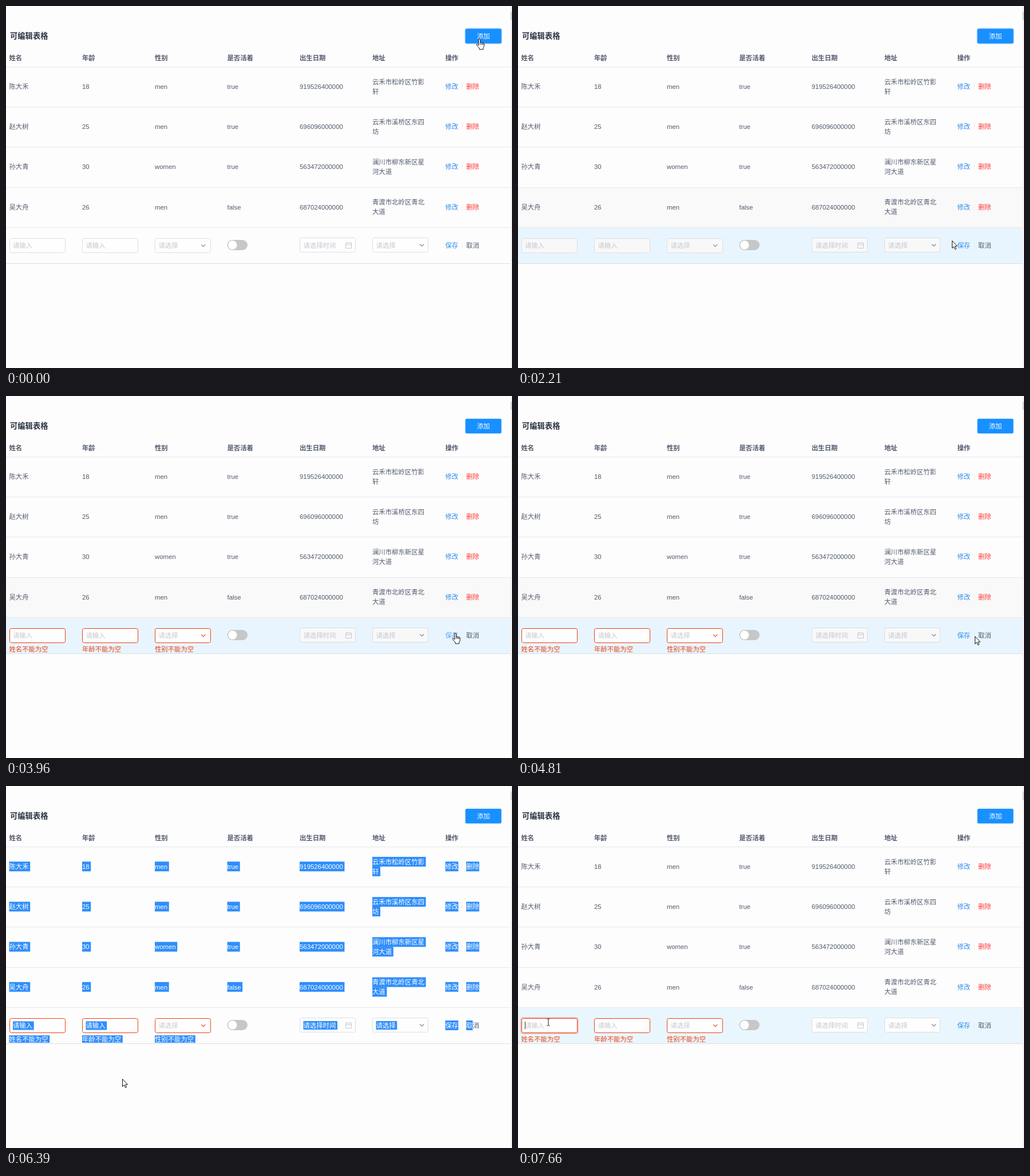
Write an HTML page that moves like this. It is 884x633 px and loops after 8000 ms.

```html
<!DOCTYPE html>
<html lang="zh-CN">
<head>
<meta charset="utf-8">
<title>可编辑表格</title>
<style>
  html, body { margin: 0; width: 100%; height: 100%; overflow: hidden; background: #fdfdfd; }
  svg { display: block; width: 884px; height: 633px; }
  text { font: 11.37px "Liberation Sans", "Noto Sans CJK SC", "Noto Sans CJK", sans-serif; white-space: pre; }
</style>
</head>
<body>
<svg id="stage" viewBox="0 0 884 633"></svg>
<script>
const LOOP = 8000;
const BLUE = '#2d8cf0', RED = '#ed4014', INK = '#515a6e', HINT = '#c5c8ce', EDGE = '#dcdee2';
const COLS = [5.5, 133, 260, 386.5, 513, 640, 767.5];
const ROW_TOPS = [106, 176, 246, 317, 387, 450];
const stage = document.getElementById('stage');

function add(tag, attrs, parent = stage) {
  const el = document.createElementNS('http://www.w3.org/2000/svg', tag);
  for (const k in attrs) el.setAttribute(k, attrs[k]);
  parent.appendChild(el);
  return el;
}
const set = (el, k, v) => el.setAttribute(k, v);
const show = (el, on) => set(el, 'visibility', on ? 'visible' : 'hidden');
const box = (x, y, width, height, fill, more) => add('rect', { x, y, width, height, fill, ...more });

// Text centred vertically on y
function label(x, y, str, fill = INK, more = {}) {
  const el = add('text', { x, y: y + 4.3, fill, ...more });
  el.textContent = str;
  return el;
}

// Text that can be shown as selected, with a highlight running `pad` past its end
const picks = [];
function pickable(x, y, str, fill = INK, pad = 2.6, h = 17) {
  const mark = box(x, y - h / 2, 0, h, '#2f8efa', { visibility: 'hidden' });
  const text = label(x, y, str, fill);
  const pick = { mark, text, fill, pad };
  picks.push(pick);
  return pick;
}
function select(pick, on) {
  if (on) set(pick.mark, 'width', pick.text.getComputedTextLength() + pick.pad);
  show(pick.mark, on);
  set(pick.text, 'fill', on ? '#fff' : pick.fill);
}

// Page, scrollbar, heading
box(0, 0, 884, 633, '#fdfdfd');
box(881.5, 0, 2.5, 633, '#f0f0f0');
box(881.5, 10, 2.5, 14, '#d2d2d2');
label(7, 53, '可编辑表格', '#2c3444', { style: 'font-size:13.3px;font-weight:700' });
const glow = box(802, 39, 64, 27, 'none', { rx: 4, stroke: BLUE, 'stroke-opacity': .25, 'stroke-width': 2 });
box(802.5, 39.8, 63, 25.6, '#1890ff', { rx: 2.5 });
label(834, 52.5, '添加', '#fff', { 'text-anchor': 'middle' });

// Table
const shades = ROW_TOPS.slice(0, 5).map((y, i) => box(0, y, 881, ROW_TOPS[i + 1] - y, '#e8f5fe', { opacity: 0 }));
const gray = box(0, ROW_TOPS[3], 881, 70, '#f9f9f9');
ROW_TOPS.forEach((y, i) => box(0, y, 881.5, 1, i === 5 ? EDGE : '#e6e8eb'));
['姓名', '年龄', '性别', '是否活着', '出生日期', '地址', '操作'].forEach((s, i) =>
  label(COLS[i], 90.5, s, INK, { style: 'font-weight:700' }));

const people = [
  ['陈大禾', '18', 'men', 'true', '919526400000', '云禾市松岭区竹影', '轩'],
  ['赵大树', '25', 'men', 'true', '696096000000', '云禾市溪桥区东四', '坊'],
  ['孙大青', '30', 'women', 'true', '563472000000', '澜川市柳东新区星', '河大道'],
  ['吴大舟', '26', 'men', 'false', '687024000000', '青渡市北岭区青北', '大道']
];
const divider = y => box(796.5, y - 5, 1, 10, '#e8eaec');
people.forEach((row, i) => {
  const y = 140.7 + i * 70.2;
  row.slice(0, 5).forEach((s, c) => pickable(COLS[c], y, s));
  pickable(COLS[5], y - 8.3, row[5]);
  pickable(COLS[5], y + 8.6, row[6]);
  pickable(COLS[6], y, '修改', BLUE, 0);
  divider(y);
  pickable(804, y, '删除', '#ff3b3b', 0);
});

// Edit row
const field = (x, y) => box(Math.round(x) + .5, y + .5, 97, 25, '#fff', { rx: 3, stroke: EDGE });
const halo = box(5, 405, 100, 28, 'none', { rx: 4, stroke: RED, 'stroke-width': 2 });
const fields = [0, 1, 2].map(i => field(COLS[i], 406));
const lateFields = [4, 5].map(i => field(COLS[i], 405));
pickable(12, 419, '请输入', HINT, 2.6, 15);
pickable(139.5, 419, '请输入', HINT, 2.6, 15);
label(266.5, 419, '请选择', HINT);
pickable(519.5, 418.5, '请选择时间', HINT, 2.6, 15);
pickable(646.5, 418.5, '请选择', HINT, 2.6, 15);
const chevron = (x, y) => add('path', {
  d: `M${x - 3.5} ${y - 1.8}l3.5 3.5l3.5 -3.5`, fill: 'none', stroke: '#808695', 'stroke-width': 1.2
});
const arrow = chevron(344.7, 419);
chevron(726.5, 418.3);
add('path', {
  d: 'M593.5 414.5h10v9h-10zM593.5 417.5h10M596 412.8v2M601 412.8v2', fill: 'none', stroke: HINT
});
box(386.5, 409, 35.5, 18, '#c6c7c8', { rx: 9 });
add('circle', { cx: 395.8, cy: 418, r: 7.7, fill: '#fff' });
const save = pickable(COLS[6], 418.5, '保存', BLUE, 0);
divider(418.5);
pickable(804, 418.5, '取', INK, 0);
const cancelEnd = pickable(815.4, 418.5, '消', INK, 0);
const errors = ['姓名不能为空', '年龄不能为空', '性别不能为空'].map((s, i) => pickable(COLS[i], 442.5, s, RED, 2.6, 13));
const caret = box(12, 412, 1, 13, '#333');

// Pointers
const pointer = (d, more) => add('path', { d, fill: '#fff', stroke: '#111', 'stroke-width': 1, 'stroke-linejoin': 'round', ...more });
const pointers = {
  arrow: pointer('M.5 .5V13.5L3.5 10.8L5.5 15.5L7.6 14.6L5.6 10H9.5Z'),
  hand: pointer('M4.8 12V2a1.4 1.4 0 0 1 2.8 0V7.2a1.3 1.3 0 0 1 2.4 .4a1.2 1.2 0 0 1 2.2 .6a1.1 1.1 0 0 1 2 .8V13.5L12.6 16.5V19H6V16.8L1.4 11.6C.3 10 2 8.8 3.2 10.2ZM7.6 7.2V10.5M10 7.6V10.8M12.2 8.4V11'),
  beam: pointer('M-2.5 -6H-.8L0 -5.4L.8 -6H2.5M0 -5.4V5.4M-2.5 6H-.8L0 5.4L.8 6H2.5', { fill: 'none', stroke: '#222' })
};

// time, x, y, shape: the pointer jumps from stop to stop
const moves = [
  [0, 821, 57, 'hand'], [290, 806, 72, 'arrow'], [440, 640, 172, 'arrow'], [580, 430, 290, 'arrow'],
  [730, 245, 384, 'arrow'], [870, 145, 439, 'arrow'], [1020, 122, 437, 'arrow'], [1170, 108, 432, 'arrow'],
  [1320, 92, 424, 'beam'], [1470, 60, 420, 'beam'], [1910, 240, 416, 'arrow'], [2060, 540, 412, 'arrow'],
  [2210, 758, 410, 'arrow'], [2340, 770, 412, 'hand'], [2490, 778, 414, 'hand'], [3220, 782, 415, 'hand'],
  [3370, 786, 416, 'hand'], [3520, 782, 415, 'hand'], [3680, 779, 414, 'hand'], [4540, 785, 416, 'hand'],
  [4680, 798, 420, 'arrow'], [4820, 809, 424, 'arrow'], [4960, 814, 426, 'arrow'], [5090, 816, 427, 'arrow'],
  [5700, 640, 530, 'arrow'], [5830, 428, 578, 'arrow'], [5980, 330, 572, 'arrow'], [6110, 262, 548, 'arrow'],
  [6260, 222, 524, 'arrow'], [6390, 203, 512, 'arrow'], [6680, 150, 478, 'arrow'], [6820, 95, 444, 'arrow'],
  [6970, 66, 422, 'beam'], [7110, 56, 415, 'beam'], [7390, 53, 413, 'beam']
];

// Linear interpolation through [time, value] stops
function track(t, stops) {
  let i = stops.length - 1;
  while (i > 0 && stops[i][0] > t) i--;
  const [a, b] = [stops[i], stops[i + 1]];
  return b ? a[1] + (b[1] - a[1]) * Math.max(0, t - a[0]) / (b[0] - a[0]) : a[1];
}

function render(t) {
  const [, x, y, shape] = moves.findLast(m => m[0] <= t);
  for (const k in pointers) show(pointers[k], k === shape);
  set(pointers[shape], 'transform', `translate(${x} ${y})`);

  const dragged = t >= 6110 && t < 7110;
  const failed = t >= 3960;
  const dull = t >= 1910 && t < 5700;

  shades.forEach((el, i) => {
    const inside = y >= ROW_TOPS[i] && y < ROW_TOPS[i + 1];
    set(el, 'opacity', i < 4 ? (inside ? .6 : 0) : track(t, [
      [0, 0], [730, 0], [870, 1], [5700, 1], [5830, .6], [5980, 0], [6680, 0], [6970, .9]
    ]));
  });
  show(gray, t >= 870 && t < 5980);
  show(glow, t < 2790);

  picks.forEach(p => select(p, dragged && p !== cancelEnd));
  if (t >= 5700 && t < 6110) select(cancelEnd, true);
  if (!dragged) set(save.text, 'fill', shape === 'hand' && t > 2000 ? '#57a3f3' : BLUE);

  fields.forEach(el => {
    set(el, 'fill', dull && !failed ? '#f8f8f8' : '#fefefe');
    set(el, 'stroke', failed ? RED : EDGE);
  });
  lateFields.forEach(el => set(el, 'fill', dull ? '#f8f8f8' : '#fefefe'));
  set(arrow, 'stroke', failed ? RED : '#808695');
  errors.forEach(e => show(e.text, failed));
  set(halo, 'stroke-opacity', track(t, [[0, 0], [7390, 0], [7530, .28]]));
  show(caret, t >= 7390);
}

function frame(now) {
  render(now % LOOP);
  requestAnimationFrame(frame);
}
render(0);
requestAnimationFrame(frame);
</script>
</body>
</html>
```
